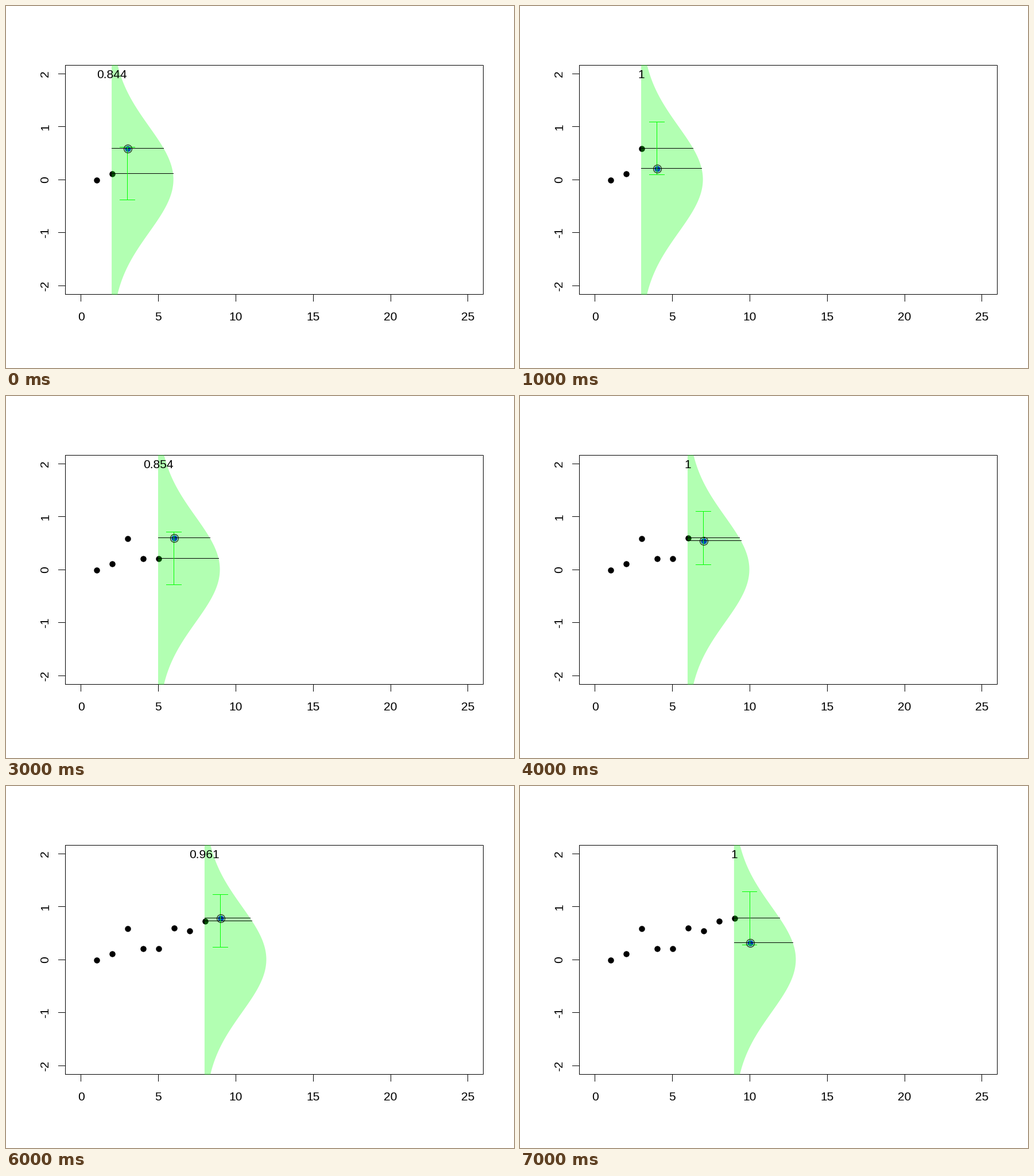
A matplotlib script for the animation above (8 s loop, 885 by 632 pixels).

```python
import numpy as np
import matplotlib.pyplot as plt
from matplotlib.animation import FuncAnimation
from matplotlib.patches import Rectangle

W, H, DPI = 885, 632, 64
PX = 72 / DPI      # points per pixel
INCH = H / 5       # the plot is laid out as a 7 x 5 inch page
LEFT, TOP = 0.82 * INCH, 0.82 * INCH
RIGHT, BOTTOM = W - 0.42 * INCH, H - 1.02 * INCH
UX, UY = (RIGHT - LEFT) / 27, (BOTTOM - TOP) / 4.32
TICK = 0.1 * INCH
FONT = dict(family="Liberation Sans", size=21 * PX, color="black",
            ha="center", va="baseline")

# Metropolis chain: accepted states and the proposal made from each one
CHAIN = [0, 0.115, 0.593, 0.215, 0.215, 0.601, 0.547, 0.733, 0.785]
PROPOSALS = [0.593, 0.215, 0.66, 0.601, 0.547, 0.733, 0.785, 0.32]
STEP = 0.5


def px(x):
    return LEFT + (np.asarray(x) + 1) * UX


def py(y):
    return (TOP + BOTTOM) / 2 - np.asarray(y) * UY


def whole(v):
    """Centre of the pixel that holds v."""
    return np.floor(v) + 0.5


def density(y):
    return 10 * np.exp(-np.square(y) / 2) / np.sqrt(2 * np.pi)


fig = plt.figure(figsize=(W / DPI, H / DPI), dpi=DPI, facecolor="white")
ax = fig.add_axes([0, 0, 1, 1])
ax.set_xlim(0, W)
ax.set_ylim(H, 0)
ax.axis("off")


def line(xs=(), ys=(), color="black", z=1):
    return ax.plot(whole(xs), whole(ys), color=color, lw=PX, zorder=z,
                   snap=False, solid_capstyle="projecting",
                   solid_joinstyle="miter")[0]


def move(part, xs, ys):
    part.set_data(whole(xs), whole(ys))


def draw_axes():
    line([LEFT, RIGHT, RIGHT, LEFT, LEFT], [BOTTOM, BOTTOM, TOP, TOP, BOTTOM])
    for x in range(0, 26, 5):
        line([px(x)] * 2, [BOTTOM, BOTTOM + TICK])
        ax.text(px(x), 549, str(x), **FONT)
    for y in range(-2, 3):
        line([LEFT, LEFT - TICK], [py(y)] * 2)
        ax.text(74, py(y), str(y), rotation=90,
                rotation_mode="anchor", **FONT)


draw_axes()

dot = dict(ls="", marker="o", ms=10.5 * PX, mew=0, zorder=2, snap=False)
history, = ax.plot([], [], color="black", **dot)
proposal, = ax.plot([], [], color="blue", **dot)
ring, = ax.plot([], [], ls="", marker="o", ms=14 * PX, mfc="none",
                mec="black", mew=PX, zorder=6, snap=False)

grid = np.linspace(-3, 3, 241)
bell, = ax.fill([0, 1, 1], [0, 0, 1], color=(0, 1, 0, 0.3), lw=0, zorder=3,
                snap=False)
x0, y0 = int(LEFT), int(TOP)
bell.set_clip_path(Rectangle((x0, y0), int(RIGHT) + 1 - x0,
                             int(BOTTOM) + 1 - y0, transform=ax.transData))
bar = [line(color="#00ff00", z=5) for _ in range(3)]
levels = [line(z=4) for _ in range(2)]
label = ax.text(0, 126, "", zorder=7, **FONT)


def update(i):
    x, cur, new = i + 2, CHAIN[i + 1], PROPOSALS[i]
    move(history, px(np.arange(1, x + 1)), py(CHAIN[:x]))
    for part in (proposal, ring):
        move(part, [px(x + 1)], [py(new)])

    edge = np.column_stack([px(x + density(grid)), py(grid)])
    bell.set_xy(np.vstack([[px(x), py(-3)], edge, [px(x), py(3)]]) - 0.5)

    mid, lo, hi = px(x + 1), py(cur - STEP), py(cur + STEP)
    move(bar[0], [mid, mid], [lo, hi])
    for part, y in zip(bar[1:], (lo, hi)):
        move(part, [mid - TICK, mid + TICK], [y, y])
    for part, y in zip(levels, (cur, new)):
        move(part, px([x, x + density(y)]), py([y, y]))

    ratio = min(1, density(new) / density(cur))
    label.set_text(f"{ratio:.3g}")
    label.set_x(px(x) - 0.5)
    return [history, proposal, ring, bell, *bar, *levels, label]


anim = FuncAnimation(fig, update, frames=len(PROPOSALS), interval=1000,
                     repeat=True, repeat_delay=0, blit=False)
plt.show()
```
